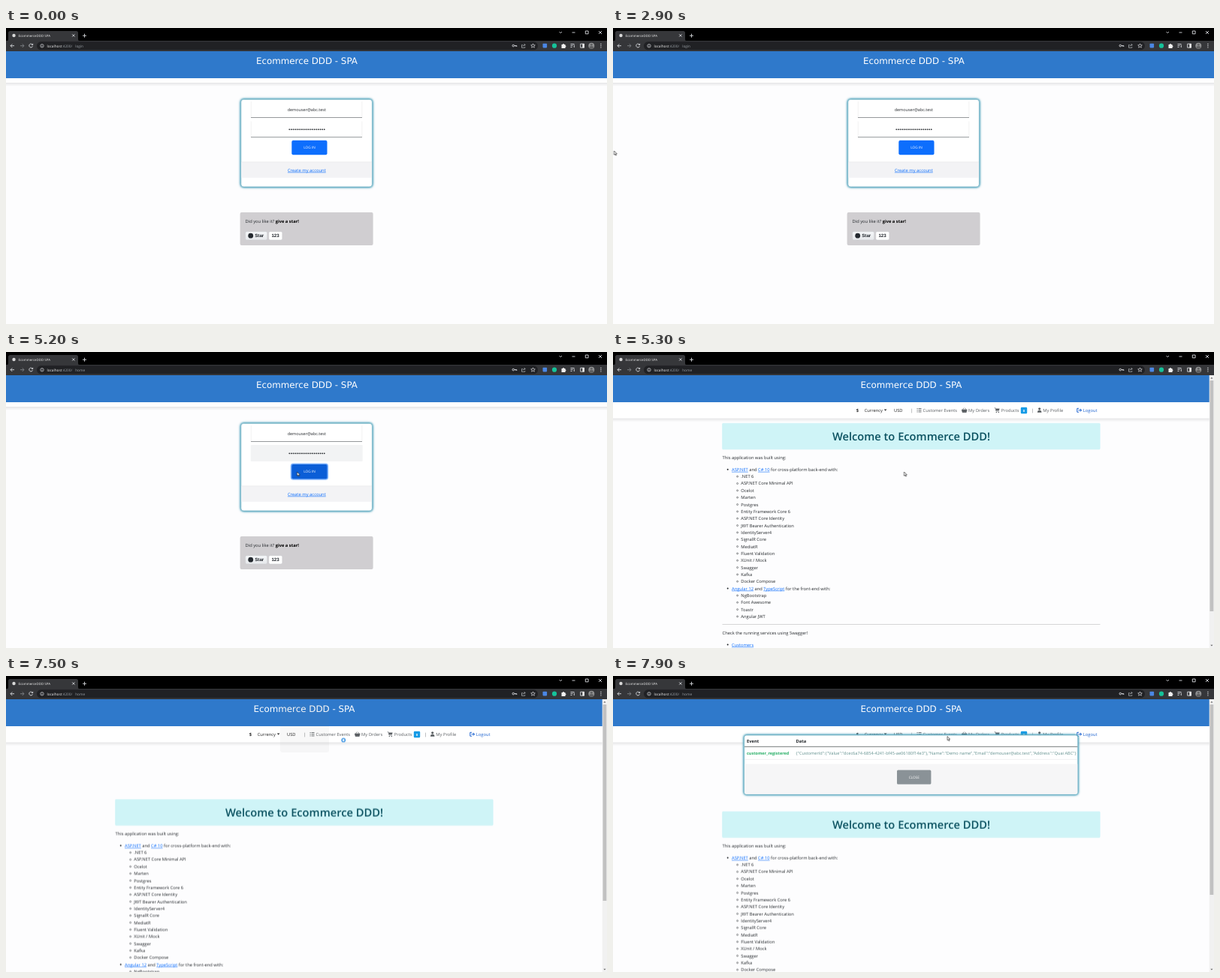
An HTML page for the animation above (8 s loop, 800 px wide and 395 px high).

```html
<!DOCTYPE html>
<html lang="en">
<head>
<meta charset="utf-8">
<title>Ecommerce DDD - SPA</title>
<style>
html, body { margin: 0; width: 100%; height: 100%; overflow: hidden; background: #fdfdfe; }
svg { display: block; width: 100%; height: 100%; }
text {
  font: 5.77px 'Open Sans', 'Noto Sans', sans-serif;
  fill: #25292d; white-space: pre; text-rendering: geometricPrecision;
}
.mid { text-anchor: middle; }
.bold { font-weight: 700; }
.link { fill: #0d6efd; text-decoration: underline; }
.brand { font: 11.85px 'DejaVu Sans', sans-serif; fill: #fff; text-anchor: middle; }
.caps { font-size: 4.7px; fill: #fff; text-anchor: middle; }
.arial { font: bold 6.2px 'Liberation Sans', Arial, sans-serif; fill: #24292f; }
.nav text { fill: #5b5f63; }
.nav .dark { fill: #222; }
.line { fill: none; stroke: #dadce0; stroke-width: .9; }
.glow { fill: #fff; stroke: #86bccb; stroke-width: .8; filter: drop-shadow(0 0 1.6px #2c93b3) drop-shadow(0 0 1px #5fa9bf); }

/* every timeline is one 8 s loop with hard changes */
.run, .run * { animation: 8s step-end infinite; }
#login { animation-name: login; }
#home { animation-name: home; }
.before { animation-name: before; }
.after { animation-name: after; }
#caret { animation-name: caret; }
#button { animation-name: button; }
#ring { animation-name: ring; }
#page { animation-name: page; }
#thumb { animation-name: thumb; }
#loader { animation-name: loader; }
#popup { animation-name: popup; }
#cursor { animation-name: move; }
#arrow { animation-name: arrow; }
#hand { animation-name: hand; }
#busy { animation-name: busy; }

@keyframes login { 0% { opacity: 1 } 66.25%, 100% { opacity: 0 } }
@keyframes home { 0% { opacity: 0 } 66.25%, 100% { opacity: 1 } }
@keyframes before { 0% { opacity: 1 } 60%, 100% { opacity: 0 } }
@keyframes after { 0% { opacity: 0 } 60%, 100% { opacity: 1 } }
@keyframes caret {
  0%, 16.25%, 35%, 48.75%, 100% { opacity: 0 }
  10%, 22.5%, 41.25% { opacity: 1 }
}
@keyframes button { 0% { fill: #0d6efd } 48.75%, 100% { fill: #0b5ed7 } }
@keyframes ring { 0% { opacity: 0 } 51.25% { opacity: .45 } 52.5% { opacity: .7 } 53.75%, 100% { opacity: 1 } }
@keyframes page {
  0% { transform: translateY(0) }
  93.75% { transform: translateY(69.5px) }
  95% { transform: translateY(79px) }
  96.25% { transform: translateY(84px) }
  97.5%, 100% { transform: translateY(85.7px) }
}
@keyframes thumb { 0% { height: 308px } 93.75% { height: 262px } 95% { height: 256px } 97.5%, 100% { height: 254px } }
@keyframes loader { 0%, 95%, 100% { opacity: 0 } 92.5% { opacity: .3 } 93.75% { opacity: .05 } }
@keyframes popup { 0% { opacity: 0 } 95% { opacity: .4 } 96.25% { opacity: .8 } 97.5%, 100% { opacity: 1 } }
@keyframes move {
  0% { transform: translate(-20px, 178px) }
  16.25% { transform: translate(-2px, 172px) }
  22.5% { transform: translate(1.5px, 164px) }
  42.5% { transform: translate(90px, 165px) }
  45% { transform: translate(210px, 163px) }
  46.25% { transform: translate(310px, 161px) }
  47.5% { transform: translate(368px, 160px) }
  48.75% { transform: translate(386px, 160px) }
  50% { transform: translate(388.5px, 160px) }
  60% { transform: translate(387.5px, 160px) }
  80% { transform: translate(411px, 146.5px) }
  82.5% { transform: translate(430px, 117px) }
  83.75% { transform: translate(446px, 96.5px) }
  86.25% { transform: translate(447px, 82.5px) }
  97.5%, 100% { transform: translate(445px, 80.5px) }
}
@keyframes arrow { 0%, 60%, 97.5%, 100% { opacity: 1 } 48.75%, 86.25% { opacity: 0 } }
@keyframes hand { 0%, 60%, 92.5%, 100% { opacity: 0 } 48.75%, 86.25% { opacity: 1 } }
@keyframes busy { 0%, 97.5%, 100% { opacity: 0 } 92.5% { opacity: 1 } }
</style>
</head>
<body>
<svg viewBox="0 0 800 395" preserveAspectRatio="none">
  <defs>
    <linearGradient id="shade" x2="0" y2="1">
      <stop stop-color="#000" stop-opacity=".09"/><stop offset="1" stop-color="#000" stop-opacity="0"/>
    </linearGradient>
    <linearGradient id="pill" x2="0" y2="1">
      <stop stop-color="#f6f8fa"/><stop offset="1" stop-color="#e6e8eb"/>
    </linearGradient>
  </defs>
  <rect width="800" height="395" fill="#fdfdfe"/>

  <!-- browser frame -->
  <g class="run">
    <rect width="800" height="18" fill="#000"/>
    <path d="M1 17.5Q3 17 3 15V6.500Q3 4 5.500 4H93.500Q96 4 96 6.500V15Q96 17 98 17.500Z" fill="#36373a"/>
    <rect y="17" width="800" height="14" fill="#353639"/>
    <rect x="41" y="18.300" width="667" height="11" rx="5.500" fill="#202124"/>
    <circle cx="10.500" cy="10" r="2.200" fill="#d8d8d8"/>
    <text x="16.500" y="11.800" style="font-size:4.4px;fill:#f1f1f1">EcommerceDDD SPA</text>
    <path class="line" d="M88.200 8.400l3.200 3.200m0-3.200l-3.200 3.200M102 10.200h5m-2.500-2.500v5M736.500 5l1.700 1.700L740 5M753.500 6h4M771.300 4h3.800v3.800h-3.800zM789 4l4 4m0-4l-4 4"/>
    <path class="line" d="M11 23.700H6m2.300-2.300L6 23.700L8.300 26"/>
    <path class="line" style="stroke:#818488" d="M19 23.700h5m-2.300-2.300l2.300 2.300l-2.300 2.300"/>
    <path class="line" d="M35.300 22.300a2.400 2.400 0 1 0 .2 2M35.700 20.900v1.700h-1.800"/>
    <circle class="line" cx="48" cy="23.800" r="2.200" style="stroke-width:.7"/>
    <path class="line" style="stroke-width:.7" d="M48 23.500v1.500m0-2.500v.5"/>
    <text x="54.500" y="25.800" style="font-size:4.75px;fill:#f1f1f1">localhost<tspan fill="#9aa0a6">:4200/</tspan></text>
    <g>
      <text class="before" x="92.200" y="25.800" style="font-size:4.75px;fill:#9aa0a6">login</text>
      <text class="after" x="92.200" y="25.800" style="font-size:4.75px;fill:#9aa0a6">home</text>
    </g>
    <circle class="line" cx="675.300" cy="23.600" r="1.300"/>
    <path class="line" d="M676.600 23.600h3.200v1.400m-1.300-1.400v1"/>
    <path class="line" style="stroke:#999ca0" d="M687.800 22.500h-1.300v3.800h4.300v-1.300M688 24.500q.3-2 3-2m-1.300-1.500l1.500 1.500l-1.500 1.500"/>
    <path class="line" style="stroke-width:.7" d="M701.500 20.900l.8 1.800l2 .2l-1.500 1.300l.5 2l-1.800-1.100l-1.800 1.100l.5-2l-1.500-1.300l2-.2z"/>
    <rect x="714.500" y="20.800" width="5.600" height="5.600" rx=".8" fill="#4b87e5"/>
    <circle cx="730" cy="23.700" r="3.100" fill="#15c39a"/>
    <path fill="#f1f1f1" d="M739.500 22h1.500a1 1 0 1 1 2 0h1.500v1.500a1 1 0 1 1 0 2v1.500h-5z"/>
    <path class="line" d="M751.500 21.500h5m-5 2h3m-3 2h2M756.300 22.500v3.500"/>
    <path class="line" d="M764.700 21.200h4.800v5h-4.800z"/><path fill="#eee" d="M767.300 21h2.500v5.300h-2.500z"/>
    <circle cx="779.300" cy="23.700" r="4" fill="#8f9091"/>
    <path fill="#5d5e60" d="M776.200 26a3.200 2.600 0 0 1 6.200 0a4 4 0 0 1-6.200 0"/><circle cx="779.300" cy="22.300" r="1.400" fill="#5d5e60"/>
    <path fill="#dadce0" d="M791.300 20.800h1.200v1.200h-1.200zm0 2.300h1.200v1.200h-1.200zm0 2.300h1.200v1.200h-1.200z"/>
    <rect y="31" width="800" height="36" fill="#2f79cb"/>
  </g>

  <!-- sign-in page -->
  <g class="run"><g id="login">
    <text class="brand" x="400.400" y="48.300">Ecommerce DDD - SPA</text>
    <rect y="67" width="800" height="6" fill="#fff"/>
    <rect y="73" width="800" height="5" fill="url(#shade)"/>
    <rect class="glow" x="312.800" y="95.300" width="174.600" height="116.600" rx="3.500"/>
    <path d="M326.300 98v21.500M473.800 98v21.500M326.300 124.500v21M473.800 124.500v21" stroke="#eee" stroke-width=".7"/>
    <rect class="after" x="326" y="124" width="148.500" height="22" rx="1" fill="#f2f3f4"/>
    <path d="M326 119.500h148" stroke="#8a8d90" stroke-width=".9"/>
    <path class="before" d="M326 145.700h148" stroke="#8a8d90" stroke-width=".9"/>
    <text class="mid" x="400.300" y="110.500" style="font-size:5.5px">demouser@abc.test</text>
    <path d="M377.300 135.300h46.800" stroke="#212529" stroke-width="1.800" stroke-linecap="round" stroke-dasharray="0 2.580"/>
    <path id="caret" d="M424.400 131v8" stroke="#333" stroke-width=".7"/>
    <rect id="ring" x="380" y="149.800" width="47.800" height="19.600" rx="2.500" fill="none" stroke="#7fb2fb" stroke-width="2.600"/>
    <rect id="button" x="380.300" y="150" width="47.200" height="19.200" rx="2" fill="#0d6efd"/>
    <text class="caps" x="404" y="161.300">LOG IN</text>
    <rect x="313.200" y="178.800" width="173.800" height="21" fill="#f3f3f5"/>
    <path d="M313.200 178.800h173.800" stroke="#e4e4e6" stroke-width=".6"/>
    <text class="mid link" x="400.300" y="191.600" style="font-size:5.85px">Create my account</text>
    <rect x="311.600" y="246" width="177" height="44" rx="2" fill="#d0ced1"/>
    <text x="318.500" y="259.600">Did you like it? <tspan class="bold" fill="#000">give a star!</tspan></text>
    <rect x="318.700" y="271.700" width="29" height="11.200" rx="1.800" fill="url(#pill)" stroke="#c9cbce" stroke-width=".5"/>
    <circle cx="325.700" cy="277.200" r="3.400" fill="#24292f"/>
    <text class="arial" x="331.200" y="279.400">Star</text>
    <rect x="349.800" y="271.700" width="18" height="11.200" rx="1.800" fill="#fff" stroke="#c9cbce" stroke-width=".5"/>
    <text class="arial mid" x="358.600" y="279.400">123</text>
  </g></g>

  <!-- home page -->
  <g class="run"><g id="home">
    <rect y="67" width="800" height="328" fill="#fdfdfe"/>
    <text class="brand" x="397" y="48.300">Ecommerce DDD - SPA</text>
    <g id="page">
      <rect x="145.600" y="95.200" width="502.600" height="34.600" rx="1" fill="#cff4f7" stroke="#c0f0f4" stroke-width=".5"/>
      <text class="mid" x="397" y="117.500" style="font-size:14.7px;font-weight:600;fill:#0a5160">Welcome to Ecommerce DDD!</text>
      <text x="145.500" y="143.200">This application was built using:</text>
      <g id="list"></g>
      <path d="M145.500 363.500h503" stroke="#c3c4c6" stroke-width=".7"/>
      <text x="145.500" y="377">Check the running services using Swagger!</text>
      <circle cx="152.700" cy="390.600" r="1" fill="#212529"/>
      <text class="link" x="158" y="392.600">Customers</text>
    </g>
    <rect y="67" width="794" height="21.500" fill="#fff"/>
    <rect y="88.500" width="794" height="5" fill="url(#shade)"/>
    <g class="nav">
      <text class="dark bold" x="323.700" y="79.700">$</text>
      <text class="dark" x="334.700" y="79.700">Currency</text>
      <path d="M360.700 76.500h3.800l-1.900 2.100z" fill="#222"/>
      <text class="dark" x="374" y="79.700">USD</text>
      <text x="396.300" y="79.700">|</text>
      <path d="M404.500 75.500h1.200m.9 0h3.900M404.500 77.700h1.200m.9 0h3.900M404.500 79.900h1.200m.9 0h3.900" stroke="#5b5f63" stroke-width=".9"/>
      <text x="412.500" y="79.700">Customer Events</text>
      <path d="M464.300 77h6.800l-.9 3.600h-5zm1.300-.3l1.300-2m2.900 2l-1.300-2" fill="#5b5f63" stroke="#5b5f63" stroke-width=".7"/>
      <text x="473" y="79.700">My Orders</text>
      <path d="M509.300 75.400h5.300l-.7 2.700h-4z" fill="#5b5f63"/>
      <path d="M507.800 74.700h1.200l1 4.300h4" fill="none" stroke="#5b5f63" stroke-width=".7"/>
      <path d="M509.700 80h1.300v1h-1.300zm3 0h1.300v1h-1.300z" fill="#5b5f63"/>
      <text x="516.700" y="79.700">Products</text>
      <rect x="542.800" y="73.800" width="8.400" height="8.400" rx="1.300" fill="#169be6"/>
      <text class="mid bold" x="547" y="79.600" style="font-size:4.2px;fill:#fff">0</text>
      <text x="557" y="79.700">|</text>
      <circle cx="567.700" cy="75.800" r="1.600" fill="#5b5f63"/>
      <path d="M565 80.800v-1q0-2 2.700-2t2.700 2v1z" fill="#5b5f63"/>
      <text x="572.300" y="79.700">My Profile</text>
      <path d="M620 75.300h-2.200v4.900h2.200M619.500 77.700h4m-1.800-1.900l1.900 1.900l-1.900 1.900" fill="none" stroke="#1c62cf" stroke-width="1"/>
      <text x="625.800" y="79.700" style="fill:#1c62cf">Logout</text>
    </g>
    <rect id="loader" x="365" y="38" width="65" height="64" rx="3" fill="#777"/>
    <rect x="793.700" y="31" width="6.300" height="364" fill="#f1f1f1"/>
    <rect id="thumb" x="794.500" y="38" width="4.800" height="308" fill="#c1c1c1"/>
    <path d="M795.300 35.500h3.200l-1.600-1.800zM795.300 390.800h3.200l-1.600 1.800z" fill="#666"/>

    <g id="popup">
      <rect class="glow" x="174.700" y="79" width="444" height="79" rx="3"/>
      <path d="M175.100 117.500h443.200v37.500q0 2.600-2.600 2.600h-438q-2.600 0-2.600-2.600z" fill="#f6f6f7"/>
      <text class="bold" x="178" y="88.700">Event</text>
      <text class="bold" x="243.500" y="88.700">Data</text>
      <path d="M175.100 94.300h443.200" stroke="#55585b" stroke-width=".8"/>
      <path d="M175.100 111.300h443.200" stroke="#e3e5e7" stroke-width=".6"/>
      <text class="bold" x="178" y="105.300" style="font-size:5.5px;fill:#2bb069">customer_registered</text>
      <text x="243.500" y="105.300" style="font-size:5.65px;fill:#63918f">{"CustomerId":{"Value":"dcec6a74-6854-4241-bf45-ae06180f14e3"},"Name":"Demo name","Email":"demouser@abc.test","Address":"Quai ABC"}</text>
      <rect x="378" y="125.500" width="45.400" height="19" rx="1.500" fill="#8a9297"/>
      <text class="caps" x="400.700" y="136.700">CLOSE</text>
    </g>
  </g></g>

  <g class="run"><g id="cursor">
    <path id="arrow" d="M0 0v5.300l1.200-1.100l.9 1.900l.9-.4l-.9-1.800h1.700z" fill="#fff" stroke="#111" stroke-width=".6"/>
    <path id="hand" d="M-.4 .4q.7-.8 1.200 0v2l2.300 .6q.7 .3 .5 1.200l-.5 2.200h-2.900l-1.800-2.600q.4-.9 1.200 0z" fill="#fff" stroke="#111" stroke-width=".6"/>
    <circle id="busy" cx="2.200" cy="3" r="2.200" fill="#fff" stroke="#2b8be0" stroke-width="1.300"/>
  </g></g>
</svg>
<script>
const link = s => `<tspan class="link">${s}</tspan>`;
const groups = [
  [`${link('ASP.NET')} and ${link('C# 10')} for cross-platform back-end with:`,
    '.NET 6', 'ASP.NET Core Minimal API', 'Ocelot', 'Marten', 'Postgres', 'Entity Framework Core 6',
    'ASP.NET Core Identity', 'JWT Bearer Authentication', 'IdentityServer4', 'SignalR Core', 'MediatR',
    'Fluent Validation', 'XUnit / Mock', 'Swagger', 'Kafka', 'Docker Compose'],
  [`${link('Angular 12')} and ${link('TypeScript')} for the front-end with:`,
    'NgBootstrap', 'Font Awesome', 'Toastr', 'Angular JWT']
];
let y = 158.8, rows = '';
for (const group of groups) {
  group.forEach((label, i) => {
    const dot = i
      ? `<circle cx="165.600" cy="${y - 2}" r="1" fill="none" stroke="#212529" stroke-width=".5"/>`
      : `<circle cx="152.700" cy="${y - 2}" r="1" fill="#212529"/>`;
    rows += `${dot}<text x="${i ? 170.3 : 158}" y="${y}">${label}</text>`;
    y += 9.34;
  });
}
document.getElementById('list').innerHTML = rows;
</script>
</body>
</html>
```
